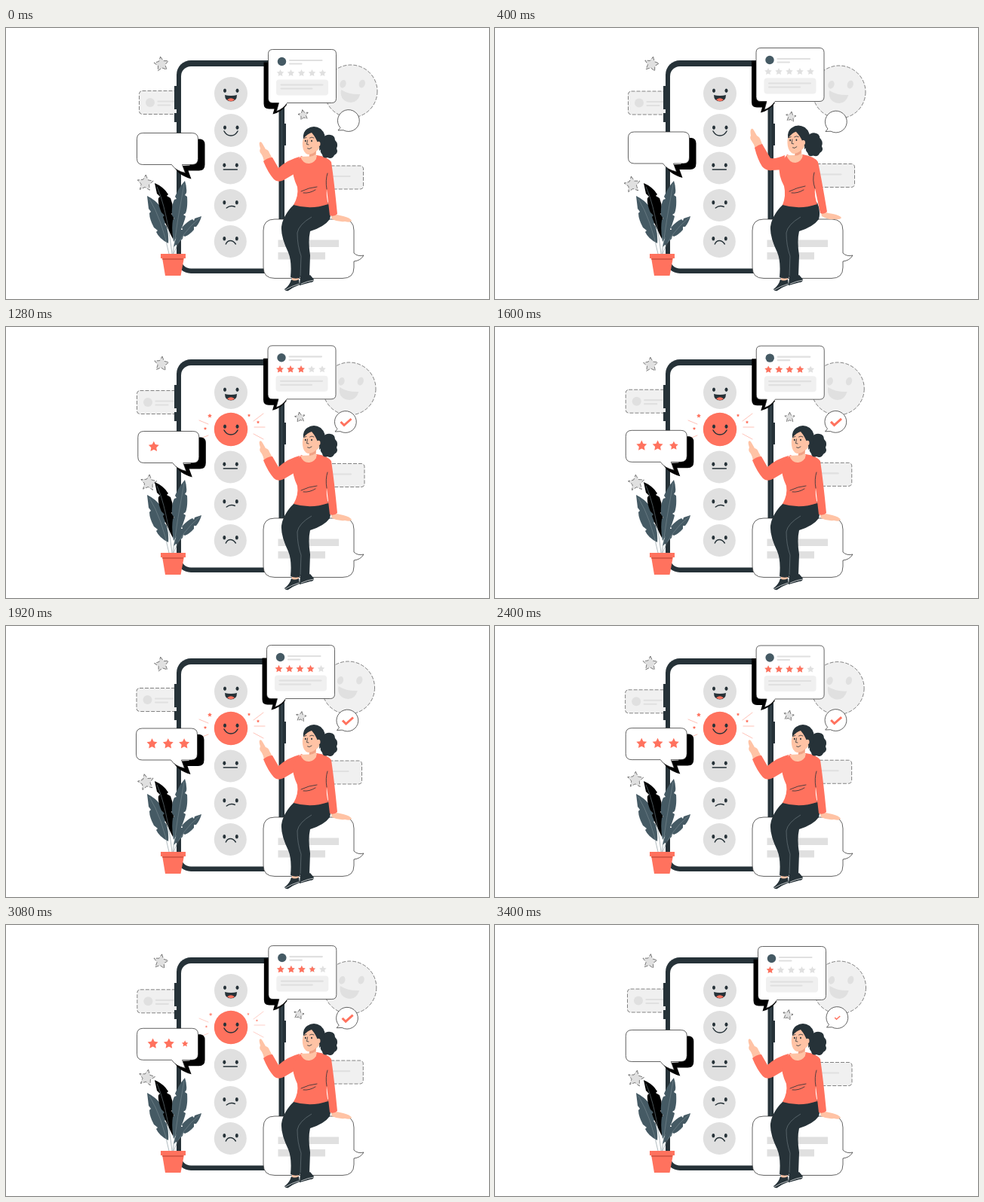
Animation of 640 by 360 pixels, one loop 3440 ms. Source, as an HTML page:

```html
<!DOCTYPE html>
<html lang="en">
<head>
<meta charset="utf-8">
<title>Feedback</title>
<style>
html, body { margin: 0; width: 100%; height: 100%; overflow: hidden; background: #fff; }
svg { display: block; width: 100vw; height: 100vh; }
.dark { fill: #263238; }
.slate { fill: #455a64; }
.grey { fill: #e0e0e0; }
.pale { fill: #f0f0f0; }
.coral { fill: #ff725e; }
.skin { fill: #ffc3a5; }
.white { fill: #fff; }
.edge { stroke: #222; stroke-width: .7; }
.rough { stroke: #333; stroke-width: .6; stroke-dasharray: 5 2; }
.line { fill: none; stroke: #263238; stroke-width: 1.5; stroke-linecap: round; stroke-linejoin: round; }
.thin { stroke-width: .8; }
.bar { fill: none; stroke: #e0e0e0; stroke-width: 2.2; stroke-linecap: round; }
.ray { fill: none; stroke: #ffb3a6; stroke-width: .8; stroke-linecap: round; }
.vein { fill: none; stroke: #7b8b93; stroke-width: .6; }
</style>
</head>
<body>
<svg viewBox="0 0 640 360">
  <g id="cardL">
    <rect class="pale rough" width="60" height="31" rx="4"/>
    <circle class="grey" cx="14.5" cy="15.5" r="6"/>
    <path class="bar" d="M25 14H48M25 19H41"/>
  </g>
  <g id="cardR">
    <rect class="pale rough" x="-75" width="75" height="31" rx="4"/>
    <path class="bar" d="M-60 14H-18"/>
  </g>
  <g id="bigFace">
    <circle class="pale rough" r="35"/>
    <g class="grey" transform="rotate(18)">
      <ellipse cx="-13" cy="-6" rx="4" ry="5.5"/>
      <ellipse cx="11" cy="-14" rx="4" ry="5.5"/>
      <path d="M-13 2Q0 5 13 0Q13 14 1 15Q-11 15 -13 2Z"/>
    </g>
  </g>
  <g id="starA"></g>
  <g id="starC"></g>

  <g id="phone">
    <path class="dark" d="M223 77h4v31h-4zM223 113h4v12h-4zM368 127h3v29h-3z"/>
    <rect class="dark" x="226" y="43" width="143" height="283" rx="19"/>
    <path d="M365.5 62V307" stroke="#37474f" stroke-width="1.5"/>
    <rect class="white" x="232" y="51" width="129.500" height="268.500" rx="13"/>
  </g>

  <g id="faces"></g>
  <g id="burst">
    <path class="ray" d="M268 129L256 124M268 144L258 148M328 125L341 115M329 133H343M328 142L341 149"/>
    <g id="sparks"></g>
  </g>

  <g id="starB"></g>
  <g id="plant">
    <path class="slate" d="M187 223Q199 229 205 238L204 240L208 243Q212 252 212 259L210 260L213 264Q216 276 215 286Q203 280 199 271L201 269L196 265Q190 254 190 246L192 244L189 240Z"/>
    <path d="M197 206Q209 211 215 221L213 223L218 226Q222 236 221 245L219 247L222 250Q224 264 221 280Q212 262 208 251L210 249L206 245Q201 234 202 226L204 224L200 220Z"/>
    <path class="slate" d="M237 203Q240 212 239 219L237 222L240 224Q241 238 238 246L235 248L238 250Q234 268 222 284Q219 268 221 255L223 253L220 249Q219 236 223 228L226 227L224 224Q229 212 237 203Z"/>
    <path class="slate" d="M259 250Q257 258 252 264L249 264L249 268Q243 275 237 277L235 276L234 280Q228 286 222 291Q225 276 231 268L234 268L233 265Q240 257 247 254L249 256L250 253Z"/>
    <path class="vein" d="M190 227Q207 255 216 300M236 207Q227 255 221 300M257 252Q232 272 222 300M200 211Q213 240 220 300"/>
    <path class="coral" d="M207 305H236L231.500 329H211Z"/>
    <path d="M207 306H235L234.500 308H207.500Z" fill="#d95746"/>
    <rect class="coral" x="205" y="300" width="33" height="6"/>
  </g>

  <g id="bubble">
    <path d="M79 8H84Q90 9 90 15V42Q90 50 82 50H68L72 61Q54 56 49 44L70 43Z"/>
    <path class="white edge" d="M8 0H73Q81 0 81 8V34Q81 42 73 42H60L64 53Q51 50 46 42H8Q0 42 0 34V8Q0 0 8 0Z"/>
  </g>

  <g id="card">
    <path d="M4 17H-6V72Q-6 79 1 79H8L6 86Q18 83 25 73L10 70Z"/>
    <path class="white edge" d="M6 0H84Q90 0 90 6V65Q90 71 84 71H25Q20 79 11 82L14 71H6Q0 71 0 65V6Q0 0 6 0Z"/>
    <circle class="slate" cx="18" cy="16" r="5.700"/>
    <path class="bar" d="M28.500 14.500H71M28.500 19H44"/>
    <rect class="pale" x="10.500" y="40" width="69" height="21" rx="4"/>
    <path class="bar" d="M17 47H72M17 52H58"/>
  </g>

  <g id="badge">
    <path class="white edge" d="M-11 9.500L-14 13L-7 12.700A14.400 14.400 0 1 0 -11 9.500Z"/>
    <path id="tick" d="M-6.500 0L-2 4.500L7.500 -4" fill="none" stroke="#ff725e" stroke-width="3"/>
  </g>

  <g id="seat">
    <path class="white edge" d="M356 254H446Q461 254 461 269V299Q466 304 474 302Q470 309 461 310V318Q461 332.500 446 332.500H356Q341 332.500 341 318V269Q341 254 356 254Z"/>
    <path class="grey" d="M360.500 281.500H441V291H360.500ZM360.500 298H423V307.500H360.500Z"/>
  </g>

  <g id="woman">
    <path class="skin" d="M379 322H387L388 337H379ZM392 320H401L402 332H393Z"/>
    <path class="dark" d="M378 334Q382 337 388 334L389 341Q381 344 374 349Q370 350 369 347Q376 342 378 334ZM390 329Q396 333 403 328L408 334Q408 338 403 338Q396 340 389 342Z"/>
    <path d="M370 348Q378 343 388 340M391 340Q400 336 408 335" fill="none" stroke="#fff" stroke-width=".7"/>
    <path class="dark" d="M383 233Q404 238 427 232Q432 243 429 254Q422 264 403 270Q400 283 403 302L402 330Q395 333 390 330L389 332Q382 334 377 331Q379 310 374 298Q364 277 365 264Q367 248 383 233Z"/>
    <path d="M405 251Q388 261 386 272Q386 289 391 303L390 329" fill="none" stroke="#6a777d" stroke-width=".7"/>
    <g id="body"></g>
    <g id="head">
      <path class="dark" d="M420 146Q424 141 430 142Q436 143 436 149Q441 154 438 160Q441 166 435 169Q432 175 426 172Q420 174 419 168Q415 164 418 158Z"/>
      <path class="skin" d="M396 141Q392 149 393 157Q394 166 400 168L402 168L401 177Q406 180 411 174V164Q419 158 418 146L410 137Z"/>
      <path d="M402 168Q408 167 411 163L410 168Q406 171 402 171Z" fill="#f0a184"/>
      <path class="dark" d="M394 147Q393 138 399 134Q408 128 417 134Q425 141 422 152Q420 160 415 163Q416 157 413 153Q411 146 405 139Q400 140 394 147Z"/>
      <ellipse class="skin" cx="414" cy="154" rx="2.500" ry="3.200"/>
      <path class="line thin" d="M394.500 146.500L398 145.500M402.500 146Q405 144 408 146M399.500 149L398.500 154.500L401 155M399.500 160Q402 162 405 159"/>
      <ellipse class="dark" cx="396.800" cy="150" rx=".9" ry="1.300"/>
      <ellipse class="dark" cx="405" cy="150" rx=".9" ry="1.300"/>
    </g>
  </g>
</svg>
<script>
const LOOP = 3440, STEP = 40;
const $ = id => document.getElementById(id);

function add(parent, tag, attrs) {
  const el = document.createElementNS("http://www.w3.org/2000/svg", tag);
  for (const k in attrs) el.setAttribute(k, attrs[k]);
  return parent.appendChild(el);
}
const place = (el, x, y, s = 1, r = 0) =>
  el.setAttribute("transform", `translate(${x} ${y}) rotate(${r}) scale(${s})`);

function starPath(r) {
  let d = "";
  for (let i = 0; i < 10; i++) {
    const a = i * Math.PI / 5, q = i % 2 ? r * .5 : r;
    d += (i ? "L" : "M") + (q * Math.sin(a)).toFixed(2) + " " + (-q * Math.cos(a)).toFixed(2);
  }
  return d + "Z";
}
const star = (parent, r, cls) =>
  add(parent, "path", { d: starPath(r), class: cls, "stroke-linejoin": "round" });

// Ramp from 0 to 1 between two times, eased
function ramp(t, a, b) {
  const u = Math.min(1, Math.max(0, (t - a) / (b - a)));
  return u * u * (3 - 2 * u);
}
const pulse = (t, [a, b, c, d]) => ramp(t, a, b) * (1 - ramp(t, c, d));

// Smooth curve through values at the key times
const KEYS = [0, 400, 920, 1280, 1920, 2800, 3400];
function glide(v, t) {
  const n = KEYS.length - 1;
  if (t >= KEYS[n]) return v[n];
  let i = 0;
  while (t >= KEYS[i + 1]) i++;
  const h = KEYS[i + 1] - KEYS[i], u = (t - KEYS[i]) / h;
  const slope = k => {
    if (k === 0 || k === n) return 0;
    const a = (v[k] - v[k - 1]) / (KEYS[k] - KEYS[k - 1]);
    const b = (v[k + 1] - v[k]) / (KEYS[k + 1] - KEYS[k]);
    return a * b <= 0 ? 0 : 2 * a * b / (a + b);
  };
  const w = u * u * (3 - 2 * u);
  return v[i] + (v[i + 1] - v[i]) * w
    + h * (u * (1 - u) * (1 - u) * slope(i) - u * u * (1 - u) * slope(i + 1));
}

const floats = {
  cardL: { x: [176.5, 176.5, 174.5, 173.5, 173, 172.5, 175.5], y: [83.5, 84, 86, 84.5, 82.5, 86.5, 85] },
  cardR: { x: [473.5, 476.5, 477.5, 475, 471.5, 473.5, 473], y: [183, 180.5, 179.5, 181.5, 179, 178, 182.5] },
  bigFace: { x: [457, 456, 455, 455, 453.5, 455, 456.5], y: [84, 85, 84, 82, 82, 83, 83] },
  bubble: { x: [173.5, 176.5, 176.8, 174.8, 172.5, 173.8, 173.3], y: [139.5, 138, 137, 138.5, 136, 135.5, 139.5] },
  card: { x: [347.5, 346, 347, 347, 345.5, 347, 348.5], y: [28.5, 26.5, 24.5, 24.8, 25.5, 26.5, 28.5] },
  badge: { x: [454, 452, 449, 450, 452.5, 451, 453.5], y: [123, 124.5, 126, 126, 125.5, 124.5, 123] },
  starA: { x: [206, 207.5, 206, 206, 206.5, 205, 205], y: [48, 48, 48.5, 49, 51, 49, 48.5], r: [-8, 12, -8, 6, -10, 10, 8] },
  starB: { x: [184.5, 182, 187, 189, 185.5, 186.5, 186.5], y: [206, 208, 207.5, 207, 207.5, 202, 204], r: [4, -8, 12, 6, -12, 12, 10] },
  starC: { x: [394, 392, 387, 389.5, 391, 388, 388], y: [115.5, 118, 120, 120, 120.5, 118, 119.5], r: [-10, 8, 12, -8, 8, 12, 12] }
};

star($("starA"), 10, "grey rough");
star($("starB"), 11, "grey rough");
star($("starC"), 7, "grey rough");

// Rating faces
const mouths = [
  "M-8 2Q0 4 8 2Q8 10.500 0 10.500T-8 2Z",
  "M-9 1Q-6 7 0 7T9 1",
  "M-9 2H9",
  "M-5 3.500Q0 -.5 6 2",
  "M-6 3.500Q-4 -1 0 -1T7 3.500"
];
let liked;
[87, 136, 186, 235.5, 283.5].forEach((y, i) => {
  const g = add($("faces"), "g", { transform: `translate(${i < 2 ? 298 : 297.3} ${y})` });
  add(g, "circle", { r: i < 2 ? 22 : 21.5, class: "grey" });
  if (i === 1) liked = add(g, "circle", { r: 22.2, class: "coral" });
  for (const x of [-8, 8.5]) add(g, "ellipse", { cx: x, cy: -3.7, rx: 2, ry: 2.7, class: "dark" });
  add(g, "path", { d: mouths[i], class: i ? "line" : "dark" });
  if (!i) add(g, "path", { d: "M-5 8.500Q0 4 5 8.500Q0 12 -5 8.500Z", class: "coral" });
});

const sparks = [[270, 118], [264, 135], [322, 117.5], [334, 126.5]].map(([x, y], i) =>
  ({ x, y, el: star($("sparks"), i ? 2.2 : 3, "coral") }));

// Stars on the review card and in the bubble
const rating = [[720, 880, 3390, 3470], [920, 1080, 3240, 3380], [1080, 1240, 3140, 3280],
  [1300, 1460, 3040, 3180], null].map((span, i) => {
  const x = 16 + i * 14;
  place(star($("card"), 5, "grey"), x, 31.5);
  return span && { x, y: 31.5, span, el: star($("card"), 5.2, "coral") };
}).filter(Boolean);
const praise = [[1100, 1270, 3220, 3360], [1300, 1460, 3120, 3260], [1480, 1640, 3020, 3160]]
  .map((span, i) => ({ x: 21 + i * 21.3, y: 20.5, span, el: star($("bubble"), 7.3, "coral") }));

// Body parts: class, resting outline, pointing outline
const parts = [
  ["skin",
    "M430 247Q440 248 447 250Q456 252 458 256Q456 259 449 257Q440 258 432 254Z",
    "M432 243Q441 246 448 247Q457 249 459 252Q457 255 450 254Q441 255 433 250Z"],
  ["skin",
    "M342 178Q341 171 338 167Q335 164 337 160Q335 154 336 152Q338 150 340 154L344 161Q348 162 349 166L354 175Z",
    "M345 161Q344 155 340 150Q337 146 339 143Q338 137 339 135Q341 132 343 136L347 143Q351 145 352 149L355 157Z"],
  ["coral",
    "M389 171Q373 175 361 186L353 172Q347 172 341 177Q347 192 355 201Q360 206 368 202L385 192Z",
    "M384 169Q373 174 365 173L354 154Q349 155 344 159Q348 175 354 184Q359 190 367 189L383 188Z"],
  ["coral",
    "M391 170Q401 175 412 169Q426 171 431 178Q435 205 439 247Q435 251 429 249L425 214Q424 224 427 234Q404 242 381 235Q388 223 386 211Q379 196 380 184Z",
    "M387 168Q397 173 408 168Q424 171 428 178Q433 202 440 244Q436 248 431 246L424 213Q423 224 427 234Q404 242 381 235Q386 223 383 210Q375 195 377 182Z"],
  ["skin",
    "M390 171Q394 181 402 180Q410 179 412 170Z",
    "M386 169Q390 179 398 179Q406 178 408 169Z"],
  ["line thin",
    "M426 193Q423 202 425 214M391 217Q401 212 412 211M394 219Q402 220 410 215",
    "M423 192Q420 202 424 213M390 217Q400 212 411 210M393 219Q401 220 409 215"]
].map(([cls, a, b]) => ({
  el: add($("body"), "path", { class: cls }),
  a, to: b.match(/[\d.]+/g).map(Number)
}));

function pose(p) {
  for (const { el, a, to } of parts) {
    let i = 0;
    el.setAttribute("d", a.replace(/[\d.]+/g, n => (+n + (to[i++] - n) * p).toFixed(2)));
  }
  $("head").setAttribute("transform", `translate(${-4.8 * p} ${-1.5 * p}) rotate(${-3 * p} 408 165)`);
}

function draw(t) {
  for (const id in floats) {
    const f = floats[id];
    place($(id), glide(f.x, t), glide(f.y, t), 1, f.r ? glide(f.r, t) : 0);
  }
  pose(pulse(t, [20, 390, 940, 1260]));
  liked.setAttribute("opacity", pulse(t, [560, 760, 3160, 3340]));
  const b = pulse(t, [800, 1100, 3020, 3220]);
  $("burst").setAttribute("opacity", b);
  for (const s of sparks)
    place(s.el, 298 + (s.x - 298) * (.8 + .2 * b), 136 + (s.y - 136) * (.8 + .2 * b), b);
  for (const s of rating.concat(praise)) place(s.el, s.x, s.y, pulse(t, s.span));
  place($("tick"), 0, 0, pulse(t, [800, 1040, 3320, 3480]));
}

const start = performance.now();
function frame(now) {
  const t = Math.max(0, now - start) % LOOP;
  draw(Math.floor(t / STEP) * STEP);
  requestAnimationFrame(frame);
}
draw(0);
requestAnimationFrame(frame);
</script>
</body>
</html>
```
